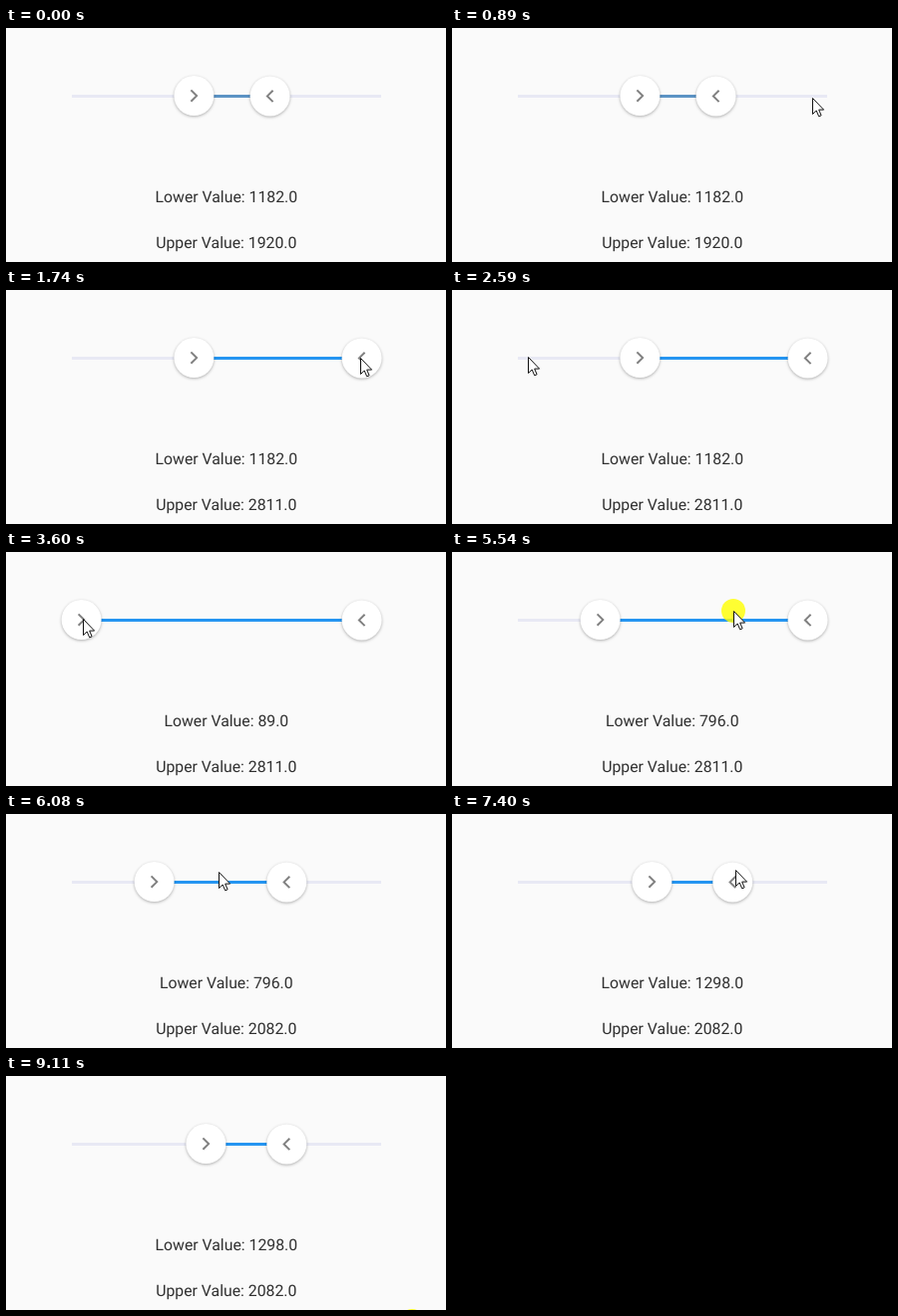
An HTML page for the animation above (9.19 s loop, 441 by 235 pixels).

```html
<!DOCTYPE html>
<html lang="en">
<head>
<meta charset="utf-8">
<title>Range slider</title>
<style>
  html, body { margin: 0; width: 100%; height: 100%; overflow: hidden; background: #fafafa; }
  svg { display: block; }
  text { font: 15.8px Roboto, sans-serif; fill: #303030; text-anchor: middle; text-rendering: geometricPrecision; }
  .thumb circle { fill: #fff; filter: drop-shadow(0 1px 1.8px rgba(0, 0, 0, .3)); }
  .thumb path { fill: none; stroke: #808080; stroke-width: 2; }
</style>
</head>
<body>
<svg width="441" height="235" viewBox="0 0 441 235">
  <rect x="66" y="67" width="310" height="3" fill="#e8e9f4"/>
  <rect id="range" y="67" height="3"/>
  <g id="low" class="thumb"><circle r="20"/><path d="M-3-5.7 2.7 0-3 5.7"/></g>
  <g id="high" class="thumb"><circle r="20"/><path d="M3-5.7-2.7 0 3 5.7"/></g>
  <text id="lowText" x="220.8" y="175"></text>
  <text id="highText" x="220.8" y="221"></text>
  <g id="cursor">
    <circle id="halo" r="12" fill="#ff0" fill-opacity=".8"/>
    <path d="M.5.5V16.5L4.2 13 6.7 18.8 9.1 17.8 6.7 12.1H11.6Z" fill="#fff" stroke="#111"/>
  </g>
</svg>
<script>
const LOOP = 9190, STEP = 77, CLICK = 150, REACT = 80;
const $ = id => document.getElementById(id);

const inOut = p => p < .5 ? (2 * p) ** 2.5 / 2 : 1 - (2 - 2 * p) ** 2.5 / 2;
const easeOut = p => 1 - (1 - p) ** 2;
const easeIn = p => p ** 1.6;

// The cursor glides to x, y in a number of steps and may click there later
const moves = [
  { at: 120, steps: 8, x: 364, y: 71, ease: easeOut },
  { at: 890, steps: 2, x: 357, y: 68, click: 1200 },
  { at: 1740, steps: 11, x: 76, y: 67, click: 2990 },
  { at: 3600, steps: 8, x: 149, y: 57, click: 4310 },
  { at: 4780, steps: 6, x: 281.7, y: 59, click: 5540 },
  { at: 5770, steps: 5, x: 213, y: 58 },
  { at: 6310, steps: 2, x: 200.8, y: 57, click: 6560 },
  { at: 6860, steps: 8, x: 284, y: 56 },
  { at: 7720, steps: 7, x: 407, y: 246, ease: easeIn, click: 9110 }
];

const place = (id, x, y) => $(id).setAttribute('transform', `translate(${x} ${y})`);
const label = (name, x) => `${name} Value: ${Math.round((x - 66.8) * 9.687)}.0`;

function stateAt(t) {
  const s = { x: 360, y: 247, low: 188.8, high: 265, color: '#5c93c4', pressed: false };
  for (const { at, steps, x, y, click, ease = inOut } of moves) {
    if (t < at) break;
    const p = ease(Math.min(1, (Math.floor((t - at) / STEP) + 1) / steps));
    s.x += (x - s.x) * p;
    s.y += (y - s.y) * p;
    s.pressed = t >= click && t < click + CLICK;
    if (t >= click + REACT) {
      // The nearer thumb jumps to the click
      s[Math.abs(x - s.low) < Math.abs(x - s.high) ? 'low' : 'high'] = x;
      s.color = '#2595f1';
    }
  }
  return s;
}

function draw(t) {
  const { x, y, low, high, color, pressed } = stateAt(t);
  place('low', low - .4, 68.1);
  place('high', high - .4, 68.4);
  $('range').setAttribute('x', low);
  $('range').setAttribute('width', high - low);
  $('range').setAttribute('fill', color);
  $('lowText').textContent = label('Lower', low);
  $('highText').textContent = label('Upper', high);
  place('cursor', Math.round(x), Math.round(y));
  $('halo').style.display = pressed ? '' : 'none';
}

const start = performance.now();
function tick() {
  draw((performance.now() - start) % LOOP);
  requestAnimationFrame(tick);
}
tick();
</script>
</body>
</html>
```
